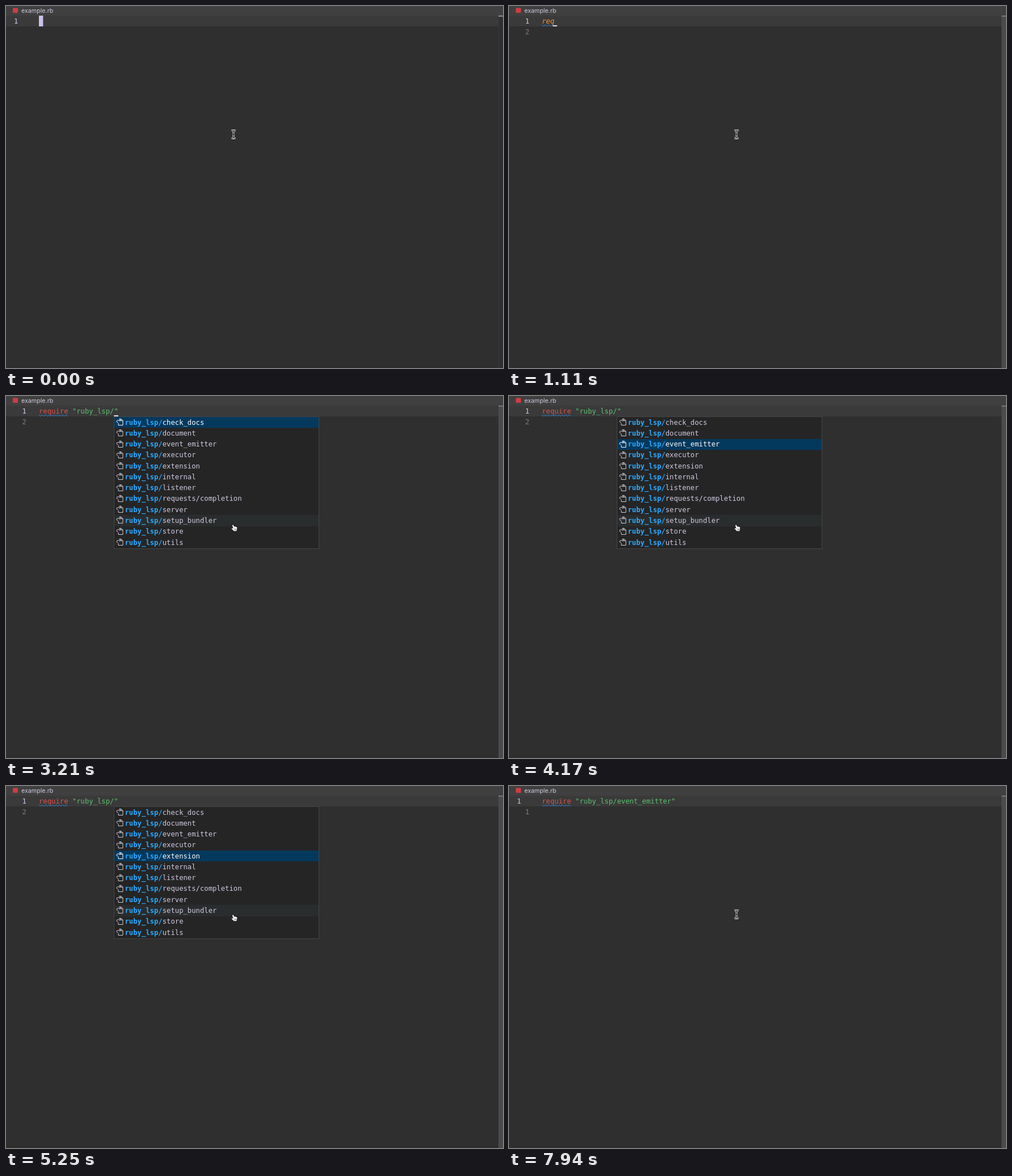
These frames come from a looping animation (876 by 639 pixels, 8000 ms). An HTML page with a canvas:

```html
<!DOCTYPE html>
<html lang="en">
<head>
<meta charset="utf-8">
<title>example.rb</title>
<style>
  html, body { margin: 0; width: 100%; height: 100%; overflow: hidden; background: #2f2f2f; }
  canvas { display: block; }
</style>
</head>
<body>
<canvas id="stage" width="876" height="639"></canvas>
<script>
const ctx = document.getElementById('stage').getContext('2d');

const LOOP = 8000;
const MONO = '12.22px "DejaVu Sans Mono", monospace';
const LEFT = 58, CHAR = 7.357;
const ROW_TOP = 37, ROW_H = 19.27;

const INSERT = 870, RECOLOUR = 1530, POPUP = 3210, POINTER_BACK = 6560;
const ACCEPT = 6620, ESCAPE = 7940;

const TYPED = 'require "ruby_lsp/';
const KEY_TIMES = [930, 1050, 1110, 1230, 1290, 1350, 1470, 1650, 1890,
                   2130, 2250, 2310, 2430, 2610, 2790, 2910, 3030, 3150];
const MOVES = [[3870, 1], [4170, 1], [4410, 1], [4590, 1], [4890, 1],
               [5250, -1], [5480, -1], [5660, -1]];
const ITEMS = ['check_docs', 'document', 'event_emitter', 'executor', 'extension',
               'internal', 'listener', 'requests/completion', 'server',
               'setup_bundler', 'store', 'utils'];
const HOVERED = 9;

function rect(x, y, w, h, color) {
  ctx.fillStyle = color;
  ctx.fillRect(x, y, w, h);
}

function text(str, x, y, color, font = MONO) {
  ctx.font = font;
  ctx.fillStyle = color;
  ctx.fillText(str, x, y);
}

function stroke(path, color, width) {
  ctx.strokeStyle = color;
  ctx.lineWidth = width;
  ctx.stroke(path);
}

// The screen refreshes in 60 ms ticks.
function tick(t) {
  const phase = t < 5480 ? 30 : 20;
  return Math.max(0, Math.floor((t - phase) / 60) * 60 + phase);
}

const ease = u => u * u * (3 - 2 * u);

// Caret opacity: solid after a key, then a smooth blink.
function blink(since) {
  if (since < 600) return 1;
  const u = (since - 600) % 1040;
  if (u < 200) return 1 - ease((u + 30) / 230);
  if (u < 600) return 0;
  return ease(Math.min(1, (u - 570) / 200));
}

function editState(t) {
  const count = KEY_TIMES.filter(k => k <= t).length;
  let line = TYPED.slice(0, count);
  let col = count, prev = Math.max(0, count - 1);
  let last = count ? KEY_TIMES[count - 1] : INSERT;
  if (t >= ACCEPT) {
    line += 'event_emitter';
    prev = col;
    col = line.length;
    last = ACCEPT;
  }
  if (count > 8) line += '"';
  const glide = Math.min(1, (t - last + 50) / 80);
  return { line, last, caret: prev + (col - prev) * glide };
}

function drawFrame(t) {
  rect(0, 0, 876, 639, '#2f2f2f');
  rect(0, 0, 876, 17, '#404040');
  rect(0, 17, 868, 19, '#3a3a3a');
  rect(0, 637, 868, 1, '#2a2a2a');
  ctx.fillStyle = '#cc3e44';
  ctx.beginPath();
  ctx.roundRect(12, 3.5, 9, 8.5, 1);
  ctx.fill();
  text('example.rb', 27, 12, '#cfc9df', '10.7px Inter, sans-serif');

  if (t < INSERT) {
    rect(868, 17, 1, 622, '#383838');
  } else {
    rect(868, 17, 8, 622, '#4b4b4b');
  }
  rect(868, 17, 8, 1.5, t < INSERT ? '#b0b0b0' : '#858585');
}

function drawNumbers(t) {
  const inserting = t >= INSERT && t < ESCAPE;
  text('1', inserting ? 28.5 : 14, 31, '#d0c9e6');
  if (t >= INSERT) text(inserting ? '2' : '1', 28.5, 50, '#7f7f7f');
}

function drawSquiggle(width) {
  const p = new Path2D();
  for (let x = 0; x <= width; x += 0.5) {
    p.lineTo(LEFT + x, 34.5 - Math.cos(x * Math.PI / 3));
  }
  stroke(p, '#3794ff', 1);
}

function drawCode(line, t) {
  const word = line.slice(0, 7);
  if (!word) return;
  const known = t >= RECOLOUR;
  text(word, LEFT, 31, known ? '#d9534f' : '#f0913c', (known ? '' : 'italic ') + MONO);
  text(line.slice(8), LEFT + 8 * CHAR, 31, '#5cc070');
  drawSquiggle(word.length * CHAR);
}

function drawCaret(t, edit) {
  if (t >= ESCAPE) return;
  if (t < INSERT) {
    ctx.globalAlpha = blink(t + 510);
    rect(LEFT, 17, 7.4, 19, '#cbc0e9');
  } else {
    ctx.globalAlpha = blink(t - edit.last);
    rect(LEFT + edit.caret * CHAR, 34, 7.4, 2, '#e6e0f5');
  }
  ctx.globalAlpha = 1;
}

const SHEET = new Path2D('M3.5 7.5V11.5H11.5V3.5L8.5.5H5M8.2.7V3.7H11.3');
const ARROW = new Path2D('M5.5 1.2L7.3 3L5.5 4.8M7 3H2.2Q.5 3 .5 4.8Q.5 6.7 2.5 6.7');

function drawPopup(t) {
  const selected = MOVES.reduce((n, [at, d]) => at <= t ? n + d : n, 0);
  rect(190, 36, 362, 234, '#454545');
  rect(191, 37, 360, 232, '#252526');
  ITEMS.forEach((item, i) => {
    const y = ROW_TOP + i * ROW_H;
    const active = i === selected;
    if (active || i === HOVERED) {
      const top = Math.round(y);
      rect(191, top, 360, Math.round(y + ROW_H) - top, active ? '#04395e' : '#2a2d2e');
    }
    ctx.save();
    ctx.translate(194.5, Math.round(y) + 3);
    stroke(SHEET, active ? '#ffffff' : '#d0cdd8', 1);
    stroke(ARROW, active ? '#ffffff' : '#d0cdd8', 1);
    ctx.restore();
    const base = Math.round(y + 13.6);
    text('ruby_lsp/', 209.5, base, '#2aaaff', 'bold ' + MONO);
    text(item, 209.5 + 9 * CHAR, base, active ? '#ffffff' : '#d1cbe0');
  });
}

const BEAM = new Path2D('M397.5 219.5H399.5L401 221L402.5 219.5H404.5M401 221V232' +
  'M397.5 233.5H399.5L401 232L402.5 233.5H404.5M399.5 226.5H402.5');
const HAND = new Path2D('M399.2 227.5Q400.5 226.5 401.3 228L402.3 230.3' +
  'Q403.5 229.5 404.2 230.5Q405.4 230 406 231Q407.5 230.8 407.7 232.5' +
  'L407.5 236L406.5 238.8H401.5L397.5 234.5Q397 233 398.6 232.8L400.2 233.5L398.5 229Z');

function drawPointer(hand) {
  if (hand) {
    ctx.fillStyle = '#ffffff';
    ctx.fill(HAND);
    stroke(HAND, '#111111', 0.8);
    stroke(new Path2D('M402.7 234V237M404.4 234V237M406 234V237'), '#333333', 0.6);
  } else {
    stroke(BEAM, '#f0f0f0', 3);
    stroke(BEAM, '#181818', 1.2);
  }
}

function draw(t) {
  const edit = editState(t);
  const open = t >= POPUP && t < ACCEPT;
  drawFrame(t);
  drawNumbers(t);
  drawCode(edit.line, t);
  drawCaret(t, edit);
  if (open) drawPopup(t);
  drawPointer(open && t < POINTER_BACK);
}

const start = performance.now();
function loop() {
  draw(tick((performance.now() - start) % LOOP));
  requestAnimationFrame(loop);
}
loop();
</script>
</body>
</html>
```
